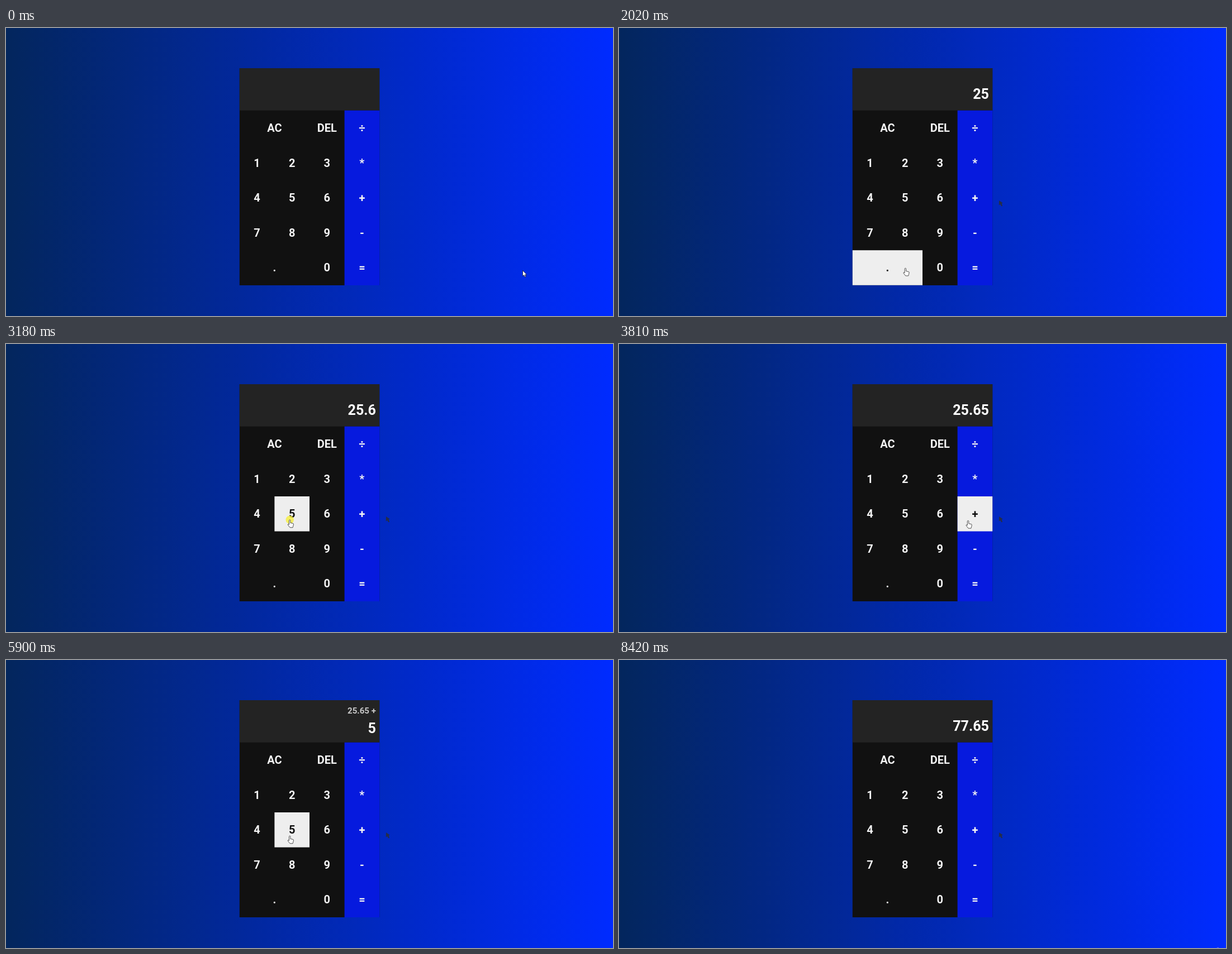
An HTML page that plays this animation: 1086 px wide and 516 px high, repeating every 8490 ms.

```html
<!DOCTYPE html>
<html lang="en">
<head>
<meta charset="utf-8">
<title>Calculator</title>
<style>
  html, body { margin: 0; width: 100%; height: 100%; overflow: hidden; }
  body { background: linear-gradient(to right, #03265d, #002bff); }
  svg { position: absolute; left: 0; top: 0; display: block; }
  text { font: 700 20.03px Roboto, sans-serif; fill: #f4f4f4; }
  .key rect { fill: none; }
  .key text { text-anchor: middle; }
  .hot rect { fill: #eee; }
  .hot text { fill: #111; }
  #prev { font-size: 15.02px; fill: #c8c8c8; text-anchor: end; }
  #now { font-size: 25.04px; fill: #fff; text-anchor: end; }
</style>
</head>
<body>
<svg width="1086" height="516" viewBox="0 0 1086 516">
  <rect x="417.8" y="72" width="250.4" height="389" fill="#111"/>
  <rect x="417.8" y="72" width="250.4" height="75.7" fill="#232323"/>
  <rect x="605.6" y="147.7" width="62.6" height="313.3" fill="#061ade"/>
  <text id="prev" x="661.9"></text>
  <text id="now" x="661.9"></text>
  <g id="keys"></g>
  <path id="mark" d="M680 309l6.6 4.6-2 1.2 1.6 3.8-2 1-2-3.6-2.4 1.4z" fill="#252d49"/>
  <path id="peek" d="M1069 516q2.5-1.6 5 0z" fill="#8fa0e8"/>
  <circle id="ring" r="7.2" fill="#f5ee3c" fill-opacity=".8"/>
  <path id="arrow" d="M0 0v10l2.3-2 1.6 3.6 1.7-.8-1.6-3.4h3z"
        fill="#fff" stroke="#111" stroke-width=".7"/>
  <path id="hand" d="M-1.2 1.2q0-1.4 1.2-1.4t1.2 1.4v4l4.2.8q1.4.3 1.3 1.7l-.6 3.2-.8 2.6H.4L-3.2 9q-.8-1.6.6-1.7L-1.2 8.2z"
        fill="#fff" stroke="#222" stroke-width=".8" stroke-linejoin="round"/>
</svg>
<script>
const LOOP = 8490, X0 = 417.8, Y0 = 147.8, CELL = 62.6, HOLD = 120;
const NS = "http://www.w3.org/2000/svg";
const $ = id => document.getElementById(id);

function add(parent, tag, attrs, label = "") {
  const el = document.createElementNS(NS, tag);
  for (const name in attrs) el.setAttribute(name, attrs[name]);
  el.textContent = label;
  return parent.appendChild(el);
}

// A space widens the key to its left.
const keys = {};
["A D÷", "123*", "456+", "789-", ". 0="].forEach((row, r) => [...row].forEach((char, c) => {
  if (char === " ") return;
  const x = X0 + c * CELL, y = Y0 + r * CELL;
  const w = row[c + 1] === " " ? 2 * CELL : CELL;
  const el = add($("keys"), "g", { class: "key" });
  add(el, "rect", { x, y, width: w, height: CELL });
  add(el, "text", { x: x + w / 2, y: y + 38.2 }, { A: "AC", D: "DEL" }[char] || char);
  keys[char] = { el, x, y, w };
}));

// The pointer rests on a key from arrival to leaving; a press ends at release.
function visit(key, arrive, leave, release = 0, dx = -4, dy = 11) {
  const { x, y, w } = keys[key];
  return { key, arrive, leave, release, x: x + w / 2 + dx, y: y + CELL / 2 + dy };
}

const visits = [
  { arrive: 0, leave: 70, x: 924.5, y: 434.5 },
  visit("2", 720, 1000, 920, 5, 13),
  visit("5", 1400, 1640, 1540),
  visit(".", 2000, 2380, 2280, 32, 1),
  visit("6", 2700, 2900, 2880),
  visit("5", 3120, 3330, 3260),
  visit("9", 3620, 3620, 0, 20, -20),
  visit("+", 3880, 5130, 4670, -6, 6),
  visit("4", 5480, 5480, 0, 25, 28),
  visit("5", 5700, 5960, 5890),
  visit("2", 6100, 6280, 6230),
  visit("0", 6720, 6760, 0, 21, -26),
  visit("=", 6960, 7440, 7200, -8, -3),
  { arrive: 8150, leave: LOOP, x: 1064, y: 520 }
];
const presses = visits.filter(v => v.release);

function tipAt(t) {
  const i = visits.findIndex(v => t <= v.leave);
  const to = visits[i], from = visits[i - 1] || to;
  if (t >= to.arrive) return [to.x, to.y];
  const u = (t - from.leave) / (to.arrive - from.leave);
  const k = u * u * (3 - 2 * u);
  return [from.x + (to.x - from.x) * k, from.y + (to.y - from.y) * k];
}

function displayAt(t) {
  let prev = "", now = "";
  for (const { key, release } of presses) {
    if (t < release) break;
    if (key === "+") [prev, now] = [now + " +", ""];
    else if (key === "=") [prev, now] = ["", String(parseFloat(prev) + Number(now))];
    else now += key;
  }
  return [prev, now];
}

function show(el, on) {
  el.style.display = on ? "" : "none";
}

function place(el, x, y) {
  el.setAttribute("transform", `translate(${x.toFixed(2)} ${y.toFixed(2)})`);
}

function draw(t) {
  const [x, y] = tipAt(t);
  let over = false;
  for (const key of Object.values(keys)) {
    const hot = x >= key.x && x < key.x + key.w && y >= key.y && y < key.y + CELL;
    key.el.classList.toggle("hot", hot);
    over = over || hot;
  }
  show($("hand"), over);
  show($("arrow"), !over && t < 8150);
  place($("hand"), x, y);
  place($("arrow"), x, y);

  show($("ring"), presses.some(p => t >= p.release - HOLD && t < p.release));
  place($("ring"), x, y - .5);

  const [prev, now] = displayAt(t);
  $("prev").textContent = prev;
  $("now").textContent = now;
  $("prev").setAttribute("y", now ? 96.4 : 103.8);
  $("now").setAttribute("y", prev ? 131 : 126.6);

  show($("mark"), t >= 440);
  show($("peek"), t >= 8420);
}

const start = performance.now();
function frame() {
  draw((performance.now() - start) % LOOP);
  requestAnimationFrame(frame);
}
frame();
</script>
</body>
</html>
```
